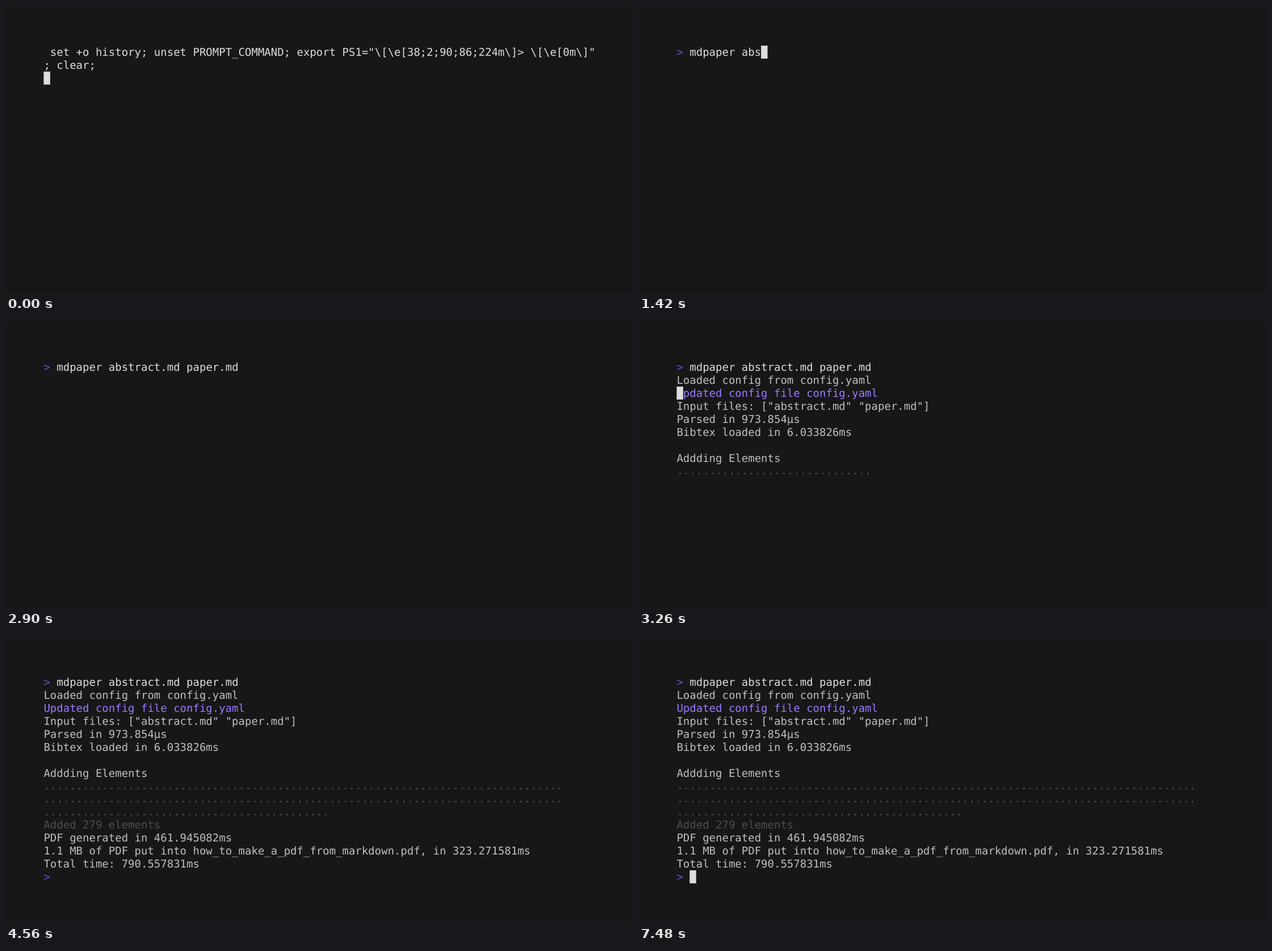
These frames come from a looping animation (1105 px wide and 507 px high, 8 s). An HTML page:

```html
<!DOCTYPE html>
<html lang="en">
<head>
<meta charset="utf-8">
<title>Terminal session</title>
<style>
  html, body { margin: 0; width: 100%; height: 100%; overflow: hidden; background: #171717; }
  svg { display: block; width: 1105px; height: 507px; }
  text {
    font: 19px "DejaVu Sans Mono", monospace;
    font-variant-ligatures: none;
    text-rendering: geometricPrecision;
    white-space: pre;
  }
</style>
</head>
<body>
<svg id="screen" viewBox="0 0 1105 507"></svg>
<script>
const LOOP = 8000, TICK = 20;
const LEFT = 66.4, TOP = 70, CELL_W = 11.438, CELL_H = 22.93, BASELINE = 18;
const ROWS = 16, DOTS_PER_ROW = 80, DOTS = 204;
const FG = '#dddddd', OUT = '#bfbfbf', DIM = '#4d4d4d', PROMPT = '#5a56e0', NOTE = '#9b79ff';

const SETUP = ' set +o history; unset PROMPT_COMMAND; export PS1="\\[\\e[38;2;90;86;224m\\]> \\[\\e[0m\\]"; clear;';
const COLS = 85;
const COMMAND = 'mdpaper abstract.md paper.md';

// Typing bursts: start time, delay per key, number of keys
const BURSTS = [[580, 54, 8], [1300, 52.5, 16], [2140, 60, 4]];

const LOG = [
  ['Loaded config from config.yaml', OUT],
  ['Updated config file config.yaml', NOTE],
  ['Input files: ["abstract.md" "paper.md"]', OUT],
  ['Parsed in 973.854µs', OUT],
  ['Bibtex loaded in 6.033826ms', OUT],
  ['', OUT],
  ['Addding Elements', OUT]
];
const BUILT = [
  ['Added 279 elements', DIM],
  ['PDF generated in 461.945082ms', OUT]
];
const SAVED = [
  ['1.1 MB of PDF put into how_to_make_a_pdf_from_markdown.pdf, in 323.271581ms', OUT],
  ['Total time: 790.557831ms', OUT]
];

const svg = document.getElementById('screen');
const add = (tag, parent) =>
  parent.appendChild(document.createElementNS('http://www.w3.org/2000/svg', tag));

const lines = Array.from({ length: ROWS }, (_, row) => {
  const el = add('text', svg);
  el.setAttribute('x', LEFT);
  el.setAttribute('y', TOP + row * CELL_H + BASELINE);
  return el;
});
const cursor = add('rect', svg);
cursor.setAttribute('width', CELL_W);
cursor.setAttribute('height', CELL_H);
cursor.setAttribute('fill', FG);

// A row is a list of [text, colour] runs.
const prompt = (text = '') => [['> ', PROMPT], [text, FG]];
const plain = (text) => [[text, FG]];
const block = (list) => list.map((run) => [run]);

function typed(t) {
  let count = 0;
  for (const [start, delay, keys] of BURSTS) {
    for (let k = 0; k < keys; k++) {
      if (t >= start + Math.ceil(k * delay / TICK) * TICK) count++;
    }
  }
  return count;
}

function dotCount(t) {
  if (t < 3280) return 30;
  if (t >= 3660) return DOTS;
  return 49 + 19 * Math.min(8, Math.floor((t - 3280) / 40));
}

function dotRows(n) {
  const rows = [];
  for (let left = n; left > 0; left -= DOTS_PER_ROW) {
    rows.push([['.'.repeat(Math.min(left, DOTS_PER_ROW)), DIM]]);
  }
  return rows;
}

// Returns the visible rows and the cursor cell [column, row], or null while it is off.
function stateAt(t) {
  if (t < 360) {
    const rows = [plain(SETUP.slice(0, COLS)), plain(SETUP.slice(COLS))];
    if (t < 200) return { rows, at: [0, 2] };
    rows.push(prompt(SETUP.slice(0, COLS - 2)), plain(SETUP.slice(COLS - 2)));
    return { rows, at: [0, 4] };
  }
  const keys = typed(t);
  const rows = [prompt(COMMAND.slice(0, keys))];
  if (t < 2900) return { rows, at: [2 + keys, 0] };
  if (t < 3040) return { rows, at: null };
  if (t < 3240) return { rows, at: [0, 1] };
  if (t < 3260) return { rows: rows.concat(block(LOG.slice(0, 1))), at: [0, 2] };

  const dots = dotCount(t);
  rows.push(...block(LOG), ...dotRows(dots));
  if (t < 3280) return { rows, at: [0, 2] };
  if (t < 3660) return { rows, at: [dots % DOTS_PER_ROW, 8 + Math.floor(dots / DOTS_PER_ROW)] };

  rows.push(...block(BUILT));
  if (t < 3960) return { rows, at: [0, 13] };
  rows.push(...block(SAVED));
  if (t < 3980) return { rows, at: [0, 15] };
  rows.push(prompt());
  const flips = [4560, 5140, 5720, 6300, 6880, 7480].filter((time) => t >= time).length;
  return { rows, at: flips % 2 ? null : [2, 15] };
}

let shown = '';
function draw(t) {
  const { rows, at } = stateAt(t);
  const key = JSON.stringify([rows, at]);
  if (key === shown) return;
  shown = key;
  lines.forEach((el, i) => {
    el.textContent = '';
    for (const [text, colour] of rows[i] || []) {
      const run = add('tspan', el);
      run.textContent = text;
      run.setAttribute('fill', colour);
    }
  });
  cursor.setAttribute('visibility', at ? 'visible' : 'hidden');
  if (at) {
    cursor.setAttribute('x', LEFT + at[0] * CELL_W);
    cursor.setAttribute('y', TOP + at[1] * CELL_H);
  }
}

const start = performance.now();
function tick() {
  draw((performance.now() - start) % LOOP);
  requestAnimationFrame(tick);
}
tick();
</script>
</body>
</html>
```
